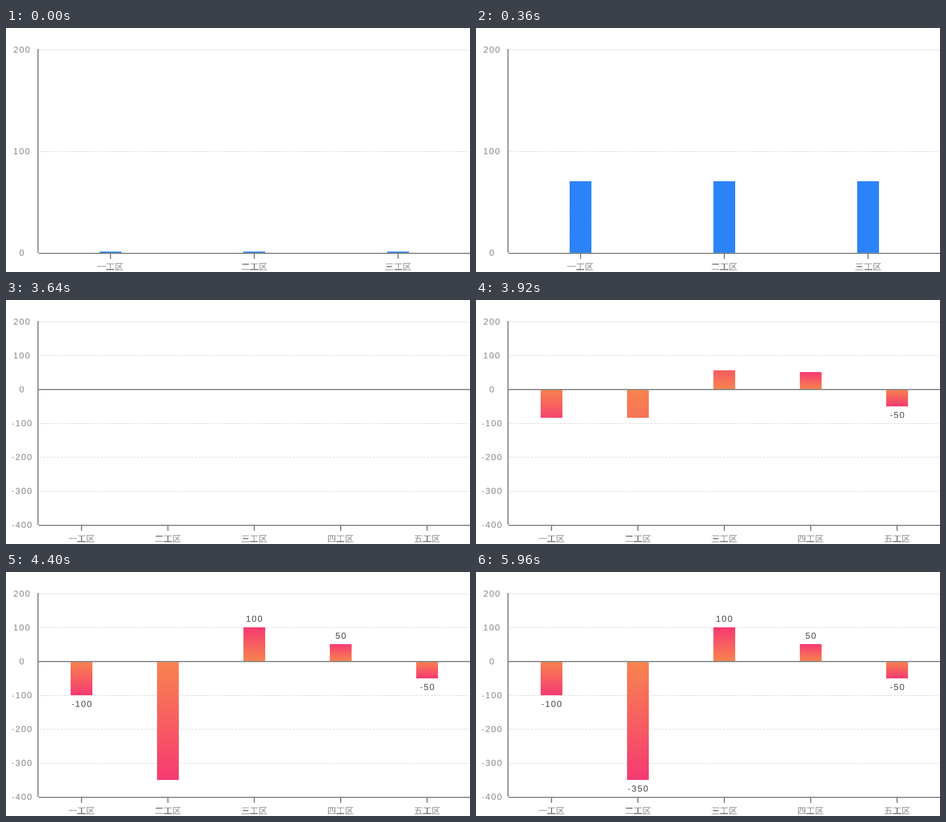
Write a matplotlib script that moves like this. It is 768 px wide and 406 px high and loops after 6.32 s.

```python
import numpy as np
import matplotlib.pyplot as plt
from matplotlib.animation import FuncAnimation
from matplotlib.colors import to_rgb
from matplotlib.patches import PathPatch
from matplotlib.textpath import TextPath
from matplotlib.transforms import Affine2D, Bbox, TransformedBbox

W, H, DPI = 768, 406, 64  # a power of two keeps the pixel size exact
STEP, LOOP, SWITCH = 40, 6320, 3640
LEFT, RIGHT, TOP, BOTTOM = 53.5, 768.5, 36, 374
BAR_W, REVEAL = 36, 1000

AXIS, GRID, TICK_TEXT, VALUE_TEXT = "#828282", "#dedede", "#888888", "#444444"
BLUE, ORANGE, PINK = "#2b83f8", "#f9844f", "#f63b72"
LATIN, CJK = "Liberation Sans", "Noto Sans CJK JP"

fig = plt.figure(figsize=(W / DPI, H / DPI), dpi=DPI, facecolor="white")
ax = fig.add_axes([0, 0, 1, 1])


def glyphs(s, size, family):
    return TextPath((0, 0), s, size=size, prop={"family": family})


def advance(ch, size, family):
    both = glyphs(ch + "0", size, family).get_extents().x1
    return both - glyphs("0", size, family).get_extents().x1


def label(x, y, s, color, family=LATIN, size=14.5, tracking=1.6):
    """Tracked text, its ink centred on (x, y)."""
    pen, paths = 0, []
    for ch in s:
        path = glyphs(ch, size, family)
        paths.append(path.transformed(Affine2D().translate(pen, 0)))
        pen += advance(ch, size, family) + tracking
    ink = Bbox.union([p.get_extents() for p in paths])
    mid = 0.38 * size if family == CJK else 0.345 * size
    place = Affine2D().translate(-(ink.x0 + ink.x1) / 2, -mid).scale(1, -1).translate(x, y)
    return [ax.add_patch(PathPatch(p.transformed(place), fc=color, lw=0, zorder=4))
            for p in paths]


def line(xs, ys, color=AXIS, width=1.9, **kw):
    kw.setdefault("zorder", 3)
    return ax.plot(xs, ys, color=color, lw=width * 72 / DPI,
                   solid_capstyle="butt", **kw)[0]


def bar(x, y0, y1, near, far):
    ramp = np.linspace(to_rgb(near), to_rgb(far), 64)[:, None, :]
    return ax.imshow(ramp, extent=(x - BAR_W / 2, x + BAR_W / 2, y0, y1),
                     origin="lower", aspect="auto", interpolation="bilinear", zorder=2)


class Chart:
    def __init__(self, values, low, near, far, lag, floor):
        self.lag, self.floor = lag, floor
        self.fixed, self.up, self.down = [], [], []

        def to_y(v):
            return BOTTOM - (v - low) / (200 - low) * (BOTTOM - TOP)

        self.zero = to_y(0)
        for v in range(low, 201, 100):
            y = to_y(v)
            self.fixed += label(26, y, str(v), TICK_TEXT)
            if v == 0 and low < 0:
                self.fixed.append(line([54, W], [y, y]))
            elif v > low:
                self.fixed.append(line([54, W], [y, y], GRID, 1.2,
                                       ls=(0, (3.4, 1.6)), zorder=1))
        self.fixed.append(line([53, 53], [TOP - 1, BOTTOM]))
        self.fixed.append(line([54, W], [BOTTOM + 0.8] * 2))

        slot = (RIGHT - LEFT) / len(values)
        for i, v in enumerate(values):
            x = LEFT + slot * (i + 0.5)
            self.fixed.append(line([x, x], [BOTTOM + 1, BOTTOM + 10]))
            self.fixed += label(x, 397, "一二三四五"[i] + "工区", TICK_TEXT, CJK, 14.6, 0)
            y, side, gap = to_y(v), self.up, -14.5
            if v < 0:
                side, gap = self.down, 14.5
            side.append(bar(x, self.zero, y, near, far))
            side += label(x, y + gap, str(v), VALUE_TEXT)

    def show(self, on, ms):
        for a in self.fixed + self.up + self.down:
            a.set_visible(on)
        if not on:
            return
        k = ease_in_out((ms + self.lag) / REVEAL)
        # Upward bars open towards the stage top, downward ones towards the axis.
        top = self.zero - max(k * self.zero, self.floor)
        clip(self.up, top, self.zero)
        clip(self.down, self.zero, self.zero + k * (BOTTOM - self.zero))


def ease_in_out(x):
    """Cubic Bezier timing (0.42, 0, 0.58, 1)."""
    x = min(max(x, 0), 1)
    s = np.linspace(0, 1, 501)
    xs = 3 * (1 - s) ** 2 * s * 0.42 + 3 * (1 - s) * s ** 2 * 0.58 + s ** 3
    return np.interp(x, xs, 3 * s ** 2 - 2 * s ** 3)


def clip(artists, top, bottom):
    box = TransformedBbox(Bbox.from_extents(0, bottom, W, top), ax.transData)
    for a in artists:
        a.set_clip_box(box)


charts = [
    Chart([100, 100, 100], 0, BLUE, BLUE, lag=31, floor=1.8),
    Chart([-100, -350, 100, 50, -50], -400, ORANGE, PINK, lag=38, floor=0),
]
ax.set_xlim(0, W)
ax.set_ylim(H, 0)
ax.axis("off")


def update(i):
    ms = i * STEP
    second = ms >= SWITCH
    charts[0].show(not second, ms)
    charts[1].show(second, ms - SWITCH)
    return []


anim = FuncAnimation(fig, update, frames=LOOP // STEP, interval=STEP,
                     repeat=True, repeat_delay=0, blit=False)
plt.show()
```
